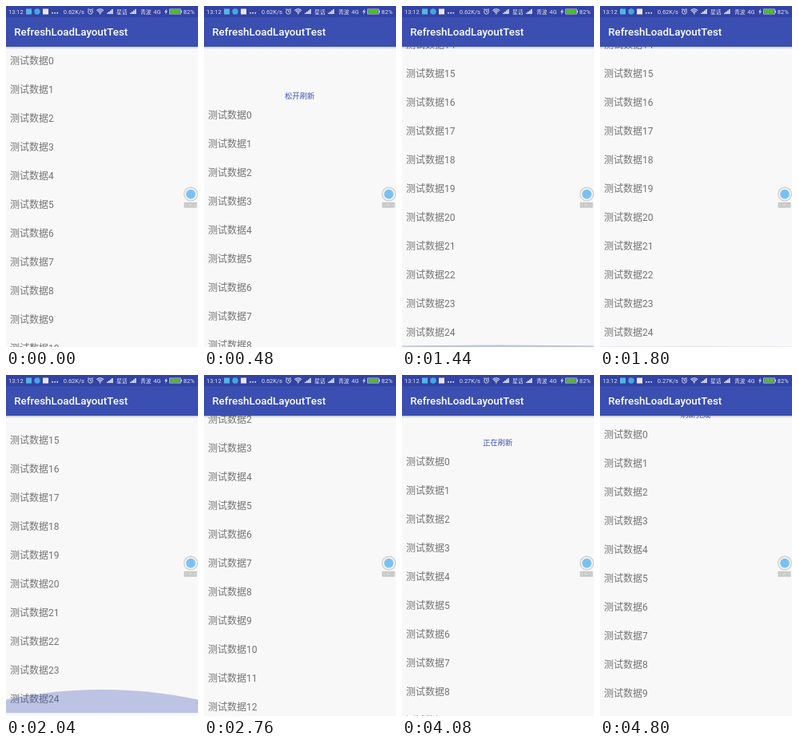
Recreate the animation shown at these times as an HTML page with a canvas. Size 240x427 px, loop 4.92 s.

```html
<!DOCTYPE html>
<html lang="zh">
<head>
<meta charset="utf-8">
<title>RefreshLoadLayoutTest</title>
<style>
html, body { margin: 0; width: 100%; height: 100%; overflow: hidden; background: #f8f8f8; }
canvas { display: block; width: 240px; height: 427px; }
</style>
</head>
<body>
<canvas id="stage"></canvas>
<script>
const W = 240, H = 427, LOOP = 4920, STEP = 120;
const TOP = 51, ROW = 36, ROWS = 25, PANEL = 40;
const MAX_SCROLL = TOP + ROWS * ROW - H;
const FONT = 'Roboto, "Noto Sans CJK SC", "Noto Sans CJK", sans-serif';
const PRIMARY = '#3f51b5', INK = '#dde1f5';

const canvas = document.getElementById('stage');
const c = canvas.getContext('2d');
const dpr = window.devicePixelRatio || 1;
canvas.width = W * dpr;
canvas.height = H * dpr;
c.scale(dpr, dpr);

const clamp = p => Math.min(1, Math.max(0, p));
const smooth = p => p * p * (3 - 2 * p);
const slow = p => 1 - (1 - p) ** 2;

// Vertical shift of the list: each move starts from where the last one ended
function shiftAt(t) {
  let y = 0;
  const move = (start, end, to, ease) => {
    y += (to - y) * ease(clamp((t - start) / (end - start)));
  };
  move(0, 560, 72, smooth);                          // pull down
  move(600, 900, PANEL, slow);                       // settle on the refresh panel
  move(1080, 1440, -MAX_SCROLL, smooth);             // fling to the end
  move(1985, 2280, -MAX_SCROLL - PANEL, smooth);     // reveal the load panel
  move(2400, 2988, 0, slow);                         // fling back to the top
  move(3000, 3450, PANEL, smooth);                   // refresh again
  move(4420, LOOP, 0, smooth);                       // close the panel
  return y;
}

function rect(x, y, w, h, fill) {
  c.fillStyle = fill;
  c.fillRect(x, y, w, h);
}

function disc(x, y, r, fill) {
  c.fillStyle = fill;
  c.beginPath();
  c.arc(x, y, r, 0, 7);
  c.fill();
}

function path(points, fill) {
  c.beginPath();
  points.forEach(([x, y]) => c.lineTo(x, y));
  c.fillStyle = fill;
  c.fill();
}

function text(s, x, y, size, fill, weight = 400, align = 'left') {
  c.font = `${weight} ${size}px ${FONT}`;
  c.textAlign = align;
  c.fillStyle = fill;
  c.fillText(s, x, y);
}

// Quick swell, then a slow fade; dir is 1 below edge y, -1 above it
function glow(age, power, y, dir) {
  const level = slow(clamp(age / 100)) * (1 - clamp((age - 100) / 600)) ** 2;
  if (level === 0) return;
  const size = level * power;
  c.save();
  c.beginPath();
  c.rect(0, y, W, dir * 60);
  c.clip();
  c.globalAlpha = level / 2;
  c.fillStyle = PRIMARY;
  c.beginPath();
  c.ellipse(W / 2, y - dir * 311.8 * size, 360, 360 * size, 0, 0, 7);
  c.fill();
  c.restore();
}

function list(t) {
  const shift = shiftAt(t);
  const end = H + Math.min(0, shift + MAX_SCROLL);
  const note = (s, y) => text(s, W / 2 - 0.3, y, 9.33, PRIMARY, 400, 'center');
  for (let i = 0; i < ROWS; i++) {
    text('测试数据' + i, 5, 73.2 + shift + i * ROW, 12, '#747474');
  }
  const pulling = shift < PANEL ? '下拉刷新' : '松开刷新';
  note(t < 660 ? pulling : t < 4260 ? '正在刷新' : '刷新完成', 47.6 + shift);
  if (end < H) note('正在加载', end + 23.5);
  glow(t - 3140, 0.93, TOP + Math.max(0, shift), 1);
  glow(t - 1400, 0.08, end, -1);
  glow(t - 2000, 0.95, end, -1);
}

function signal(x) {
  path([[x, 10], [x + 8, 10], [x + 8, 3.5]], '#ffffff66');
  for (let i = 0; i < 4; i++) rect(x + i * 2, 8.5 - i * 1.5, 1.4, 1.5 + i * 1.5, INK);
}

function alarm(x, y) {
  c.lineWidth = 0.9;
  c.beginPath();
  c.arc(x, y, 2.9, 0, 7);
  c.moveTo(x, y - 1.8);
  c.lineTo(x, y + 0.2);
  c.lineTo(x + 1.5, y + 0.2);
  for (const side of [-1, 1]) {
    c.moveTo(x + side * 3.5, y - 2.6);
    c.lineTo(x + side * 1.9, y - 3.9);
  }
  c.stroke();
}

function wifi(x, y) {
  c.lineWidth = 1.1;
  for (let r = 2.2; r < 7; r += 2) {
    c.beginPath();
    c.arc(x, y, r, -2.35, -0.79);
    c.stroke();
  }
  disc(x, y - 0.3, 0.8, INK);
}

function battery(x, y) {
  c.lineWidth = 0.8;
  c.strokeRect(x, y, 13.5, 6);
  rect(x + 0.7, y + 0.7, 12, 4.6, '#50bd20');
  rect(x + 13.9, y + 1.6, 1.2, 2.8, INK);
}

function statusBar(t) {
  const say = (s, x, size = 7.5) => text(s, x, 9.6, size, INK);
  c.strokeStyle = INK;
  rect(0, 0, W, 14, '#3243a3');
  say('13:12', 3);
  rect(25, 3.5, 7, 7, '#55b4e8');
  disc(39, 7, 3.7, '#45a6e2');
  rect(46, 3.5, 7, 7, '#ece4ea');
  for (let i = 0; i < 3; i++) disc(58 + i * 3.1, 8.8, 0.95, INK);
  say(t < 4000 ? '0.62K/s' : '0.27K/s', 71.7);
  alarm(105.5, 7.2);
  wifi(117.7, 10);
  signal(126);
  say('星话', 138, 6.8);
  signal(155);
  say('青波', 168, 6.8);
  say('4G', 184.2);
  path([[201, 3.5], [198, 7.6], [199.8, 7.6], [199, 10.8], [202, 6.5], [200.3, 6.5]], INK);
  battery(204.7, 4);
  say('82%', 221.8);
}

function toolbar() {
  rect(0, 14, W, TOP - 14, '#3a4fb1');
  text('RefreshLoadLayoutTest', 10.3, 37, 13.33, '#fff', 500);
  const shade = c.createLinearGradient(0, TOP, 0, TOP + 3);
  shade.addColorStop(0, 'rgba(0,0,0,.2)');
  shade.addColorStop(1, 'rgba(0,0,0,0)');
  rect(0, TOP, W, 3, shade);
}

function floater() {
  disc(231, 235.6, 9, '#c6c8ca');
  disc(231, 235.6, 7.9, '#f0f1f2');
  disc(231, 235.6, 5.8, '#79c1f1');
  rect(222.5, 245.8, 16, 6.8, '#c4c5c6');
  text('0.6K/s', 230.5, 251, 4.6, '#e6e6e6', 400, 'center');
}

function frame() {
  const t = Math.floor(performance.now() % LOOP / STEP) * STEP;
  rect(0, 0, W, H, '#f8f8f8');
  list(t);
  toolbar();
  statusBar(t);
  floater();
  requestAnimationFrame(frame);
}
frame();
</script>
</body>
</html>
```
